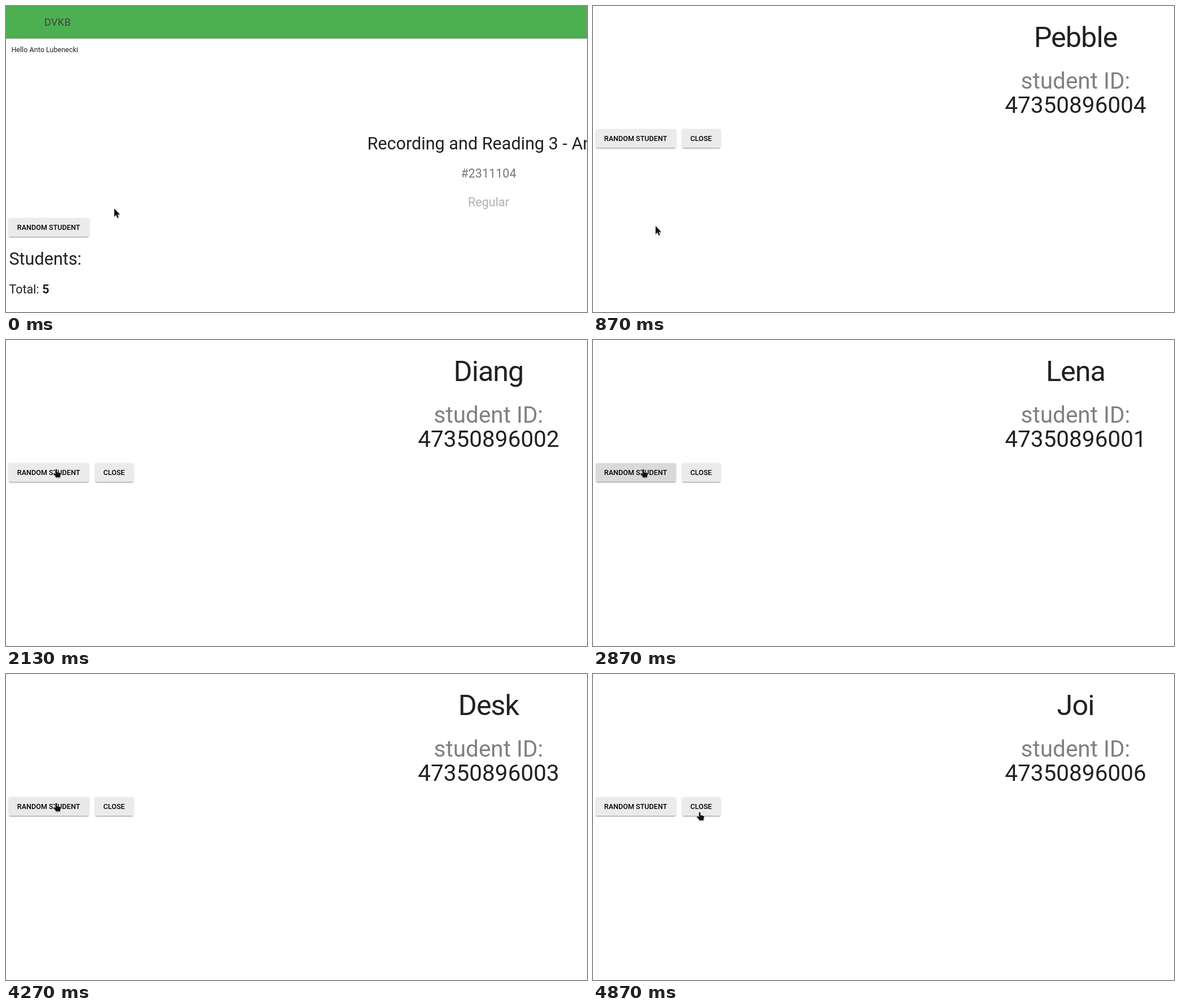
Recreate the animation shown at these times as an HTML page. Size 1030 by 544 pixels, loop 5.74 s.

```html
<!DOCTYPE html>
<html lang="en">
<head>
<meta charset="utf-8">
<title>Random student</title>
<style>
html, body { margin: 0; width: 100%; height: 100%; overflow: hidden; background: #fff; }
#stage { position: relative; width: 1030px; height: 544px; overflow: hidden; color: #212121; font-family: Roboto, sans-serif; }
#bar { position: absolute; width: 1030px; height: 57.6px; background: #4caf50; }

/* --y is the baseline, --a the ascent */
p {
  position: absolute; margin: 0; white-space: pre; line-height: normal;
  top: calc((var(--y) - var(--a)) * 1px); left: calc(var(--x) * 1px);
}
.mid { left: 355.5px; width: 1000px; text-align: center; }
.small { font-size: 12.6px; --a: 12; }
.title { font-size: 18px; --a: 17; letter-spacing: .02em; color: #424242; }
.head { font-size: 21.6px; --a: 20; }
.big { font-size: 30.6px; --a: 28; }
.id { font-size: 40.5px; --a: 38; }
.name { font-size: 50.4px; --a: 47; letter-spacing: -.02em; }

.btn {
  position: absolute; top: 219.4px; height: 32.4px; border-radius: 1.8px; background: #ebebeb; color: #000;
  box-shadow: 0 2.7px .9px -1.8px rgba(0,0,0,.2), 0 1.8px 1.8px rgba(0,0,0,.14), 0 .9px 4.5px rgba(0,0,0,.12);
}
.btn p { font-weight: 500; --x: 14.4; --y: 20.6; }
#random { left: 5.4px; width: 141.2px; }
#close { left: 158.2px; width: 67.4px; }
#tint { height: 100%; border-radius: inherit; background: #000; }

svg { position: absolute; left: 0; top: 0; }
.cursor { fill: #111; stroke: #fff; stroke-width: 1; paint-order: stroke; stroke-linejoin: round; filter: drop-shadow(.8px 1px .6px rgba(0,0,0,.45)); }
</style>
</head>
<body>
<div id="stage">
  <div id="course">
    <div id="bar"></div>
    <p class="title" style="--x:68;--y:35">DVKB</p>
    <p class="small" style="--x:9.4;--y:82">Hello Anto Lubenecki</p>
    <p class="big" style="--x:640.4;--y:255">Recording and Reading 3 - Anto Lubenecki</p>
    <p class="head mid" style="--y:305;color:#777">#2311104</p>
    <p class="head mid" style="--y:356;color:#b0b0b0">Regular</p>
    <p class="big" style="--x:5.4;--y:460">Students:</p>
    <p class="head" style="--x:5.4;--y:511">Total: <b>5</b></p>
  </div>
  <div id="pick">
    <p class="name mid" id="name" style="--y:73"></p>
    <p class="id mid" style="--y:147;color:#808080">student ID:</p>
    <p class="id mid" id="number" style="--y:190"></p>
    <div class="btn" id="close"><p class="small">CLOSE</p></div>
  </div>
  <div class="btn" id="random"><div id="tint"></div><p class="small">RANDOM STUDENT</p></div>
  <svg width="1030" height="544" viewBox="0 0 1030 544">
    <path class="cursor" id="arrow" d="M0 0V14.2L3.2 11.2L5.6 16.4L7.8 15.4L5.5 10.4H9.8Z"/>
    <path class="cursor" id="hand" d="M.9 -.7Q2.2 -2.3 3.4 -.7V4L8.4 5.1Q10.2 5.6 9.9 7.4L8.9 11.2V13H1.2V11.6L-2.8 7.2Q-2.8 5.6 -1.2 5.9L.9 7.2Z"/>
  </svg>
</div>
<script>
const LOOP = 5740;
const $ = id => document.getElementById(id);

// first tick, name, last three digits
const picks = [
  [13, 'Pebble', '004'], [30, 'Diang', '002'], [43, 'Lena', '001'],
  [53, 'Desk', '003'], [65, 'Joi', '006']
];
// first tick, button darkening per tick
const clicks = [
  [11, .03, .08], [29, .03, .055, .03], [42, .03, .08, .08, .04],
  [52, .045, .05, .025], [64, .008, .05, .025]
];
// ticks before and at the end, then start, control and end points
const moves = [
  [1, 7, 192, 360, 150, 372, 111, 391],
  [17, 26, 111, 391, 140, 318, 87, 231],
  [66, 72, 87, 231, 138, 286, 184, 247],
  [72, 73, 184, 247, 186, 247, 187, 247]
];

// ticks of 70, 60 and 70 ms
function tickAt(t) {
  const r = t % 200;
  return 3 * Math.floor(t / 200) + (r >= 130 ? 2 : r >= 70 ? 1 : 0);
}

function cursorAt(k) {
  const [a, b, x0, y0, x1, y1, x2, y2] = moves.filter(m => k > m[0]).pop() || moves[0];
  const u = Math.max(0, Math.min(1, (k - a) / (b - a)));
  const p = u * u * (3 - 2 * u);
  const curve = (s, c, e) => (1 - p) ** 2 * s + 2 * p * (1 - p) * c + p * p * e;
  return [curve(x0, x1, x2), curve(y0, y1, y2)];
}

function show(id, on) { $(id).style.display = on ? '' : 'none'; }

function draw(t) {
  const k = tickAt(t);
  const pick = picks.filter(p => k >= p[0]).pop();
  const top = pick ? 219.4 : 377.4;
  const [x, y] = cursorAt(k);

  show('course', !pick);
  show('pick', pick);
  if (pick) {
    $('name').textContent = pick[1];
    $('number').textContent = '47350896' + pick[2];
  }
  $('random').style.top = top + 'px';

  const click = clicks.filter(c => k >= c[0]).pop();
  $('tint').style.opacity = click && click[k - click[0] + 1] || 0;

  const inRow = y > top && y < top + 32.4;
  const over = inRow && (x > 5 && x < 147 || pick && x > 158 && x < 226);
  show('hand', over);
  show('arrow', !over);
  for (const id of ['hand', 'arrow'])
    $(id).setAttribute('transform', `translate(${Math.round(x)} ${Math.round(y)})`);
}

const start = performance.now();
function loop() {
  draw((performance.now() - start) % LOOP);
  requestAnimationFrame(loop);
}
loop();
</script>
</body>
</html>
```
